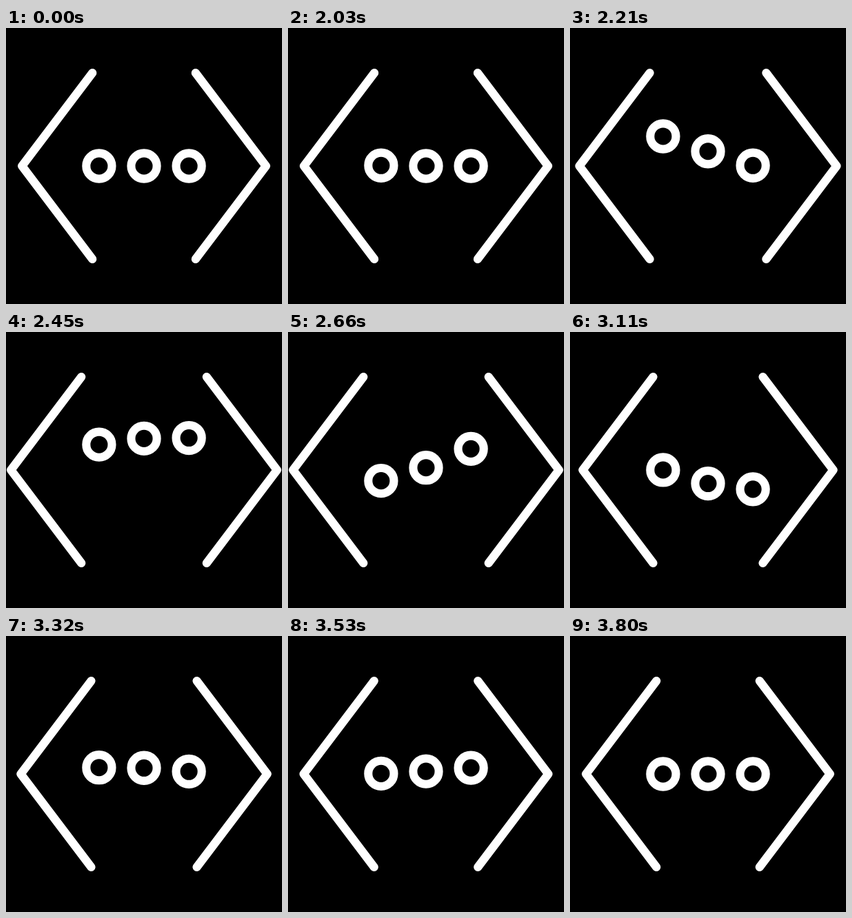
Write an HTML page that moves like this. It is 400x400 px and loops after 3.83 s.

```html
<!DOCTYPE html>
<html lang="en">
<head>
<meta charset="utf-8">
<title>Code brackets</title>
<style>
  html, body { margin: 0; width: 100%; height: 100%; overflow: hidden; background: #000; }
  svg { display: block; width: 100%; height: 100%; }
</style>
</head>
<body>
<svg viewBox="0 0 400 400" fill="none" stroke="#fff" stroke-width="12.1" stroke-linecap="round" stroke-linejoin="round">
  <path id="left" d="M125.3 65 23.2 200 125.3 335"/>
  <path id="right" d="M274.7 65 376.8 200 274.7 335"/>
  <circle class="dot" cx="134.9" cy="200" r="18.6"/>
  <circle class="dot" cx="200" cy="200" r="18.6"/>
  <circle class="dot" cx="265.1" cy="200" r="18.6"/>
</svg>
<script>
const LOOP = 3830, HOLD = 2000, STEP = 30;
const DOT_DELAY = 6;

// Keyframes as [tick, offset]; one tick is half a step.
const SPREAD = { ease: bezier(0.4, 0.2), keys: [[0, 0], [36, 16.3], [120, 0]] };
const BOUNCE = { ease: bezier(0.5, 0.28), keys: [[0, 0], [20, -46.8], [60, 28.2], [86, -9.4], [108, 0]] };

const left = document.getElementById('left');
const right = document.getElementById('right');
const dots = document.querySelectorAll('.dot');

// cubic-bezier(x1, 0, x2, 1), solved by bisection
function bezier(x1, x2) {
  return x => {
    let lo = 0, hi = 1;
    for (let i = 0; i < 24; i++) {
      const s = (lo + hi) / 2, r = 1 - s;
      if (3 * x1 * s * r * r + 3 * x2 * s * s * r + s * s * s < x) lo = s;
      else hi = s;
    }
    return lo * lo * (3 - 2 * lo);
  };
}

function valueAt({ ease, keys }, tick) {
  if (tick <= keys[0][0]) return keys[0][1];
  for (let i = 1; i < keys.length; i++) {
    const [t0, a] = keys[i - 1], [t1, b] = keys[i];
    if (tick < t1) return a + (b - a) * ease((tick - t0) / (t1 - t0));
  }
  return keys[keys.length - 1][1];
}

function render(ms) {
  const tick = 2 * Math.max(0, Math.floor((ms - HOLD) / STEP));
  const spread = valueAt(SPREAD, tick);
  left.setAttribute('transform', `translate(${-spread} 0)`);
  right.setAttribute('transform', `translate(${spread} 0)`);
  dots.forEach((dot, i) => dot.setAttribute('cy', 200 + valueAt(BOUNCE, tick - i * DOT_DELAY)));
}

const start = performance.now();
function loop() {
  render((performance.now() - start) % LOOP);
  requestAnimationFrame(loop);
}
loop();
</script>
</body>
</html>
```
